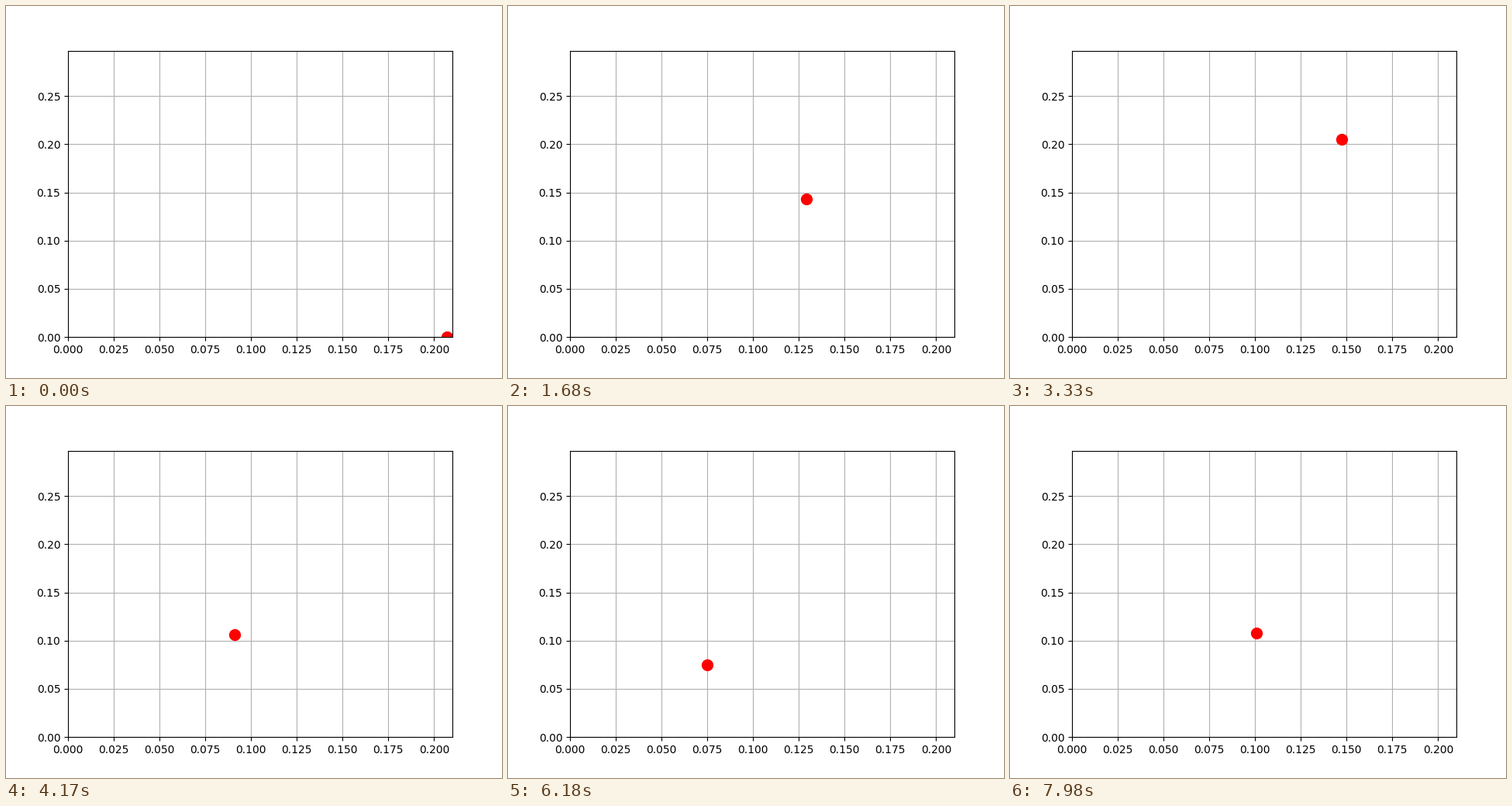
Write a matplotlib script that moves like this. It is 640 px wide and 480 px high and loops after 8000 ms.

```python
import math
import matplotlib.pyplot as plt
from matplotlib.animation import FuncAnimation

W, H = 0.21, 0.297                # A4 sheet in metres
LOOP, TICK, STEP = 8000, 20, 30   # ms

# Turning points of the swing about the sheet centre: (seconds, pixels)
TURNS_X = [(0.115, 250), (1.22, -100), (1.89, 102), (2.45, -178),
           (3.167, 109), (4.2, -33), (4.7, 15), (5.45, -108), (5.87, -52),
           (6.58, -100), (6.85, -92), (7.21, -111), (7.95, -10)]
TURNS_Y = [(0, 184.6), (0.53, -4), (1.26, 31), (2.04, -13), (2.6, 122),
           (3.5, -88), (4.51, 100), (5.36, -51), (6.04, 106), (6.87, -97),
           (7.735, 84)]


def swing(turns, t):
    """Cosine ease between turning points, carried on past both ends."""
    spans = list(zip(turns, turns[1:]))
    (t0, a), (t1, b) = next((s for s in spans if t < s[1][0]), spans[-1])
    return (a + b) / 2 + (a - b) / 2 * math.cos(math.pi * (t - t0) / (t1 - t0))


fig, ax = plt.subplots(figsize=(6.4, 4.8), dpi=100)
ax.set_xlim(0, W)
ax.set_ylim(0, H)
ax.grid()
pen, = ax.plot([], [], "ro", markersize=10)
px, py = W / 496, H / 369.6       # metres per pixel


def update(i):
    t = (i * TICK + TICK // 2) // STEP * STEP / 1000
    pen.set_data([W / 2 + swing(TURNS_X, t) * px],
                 [H / 2 - swing(TURNS_Y, t) * py])
    return pen,


def reset():
    return update(0)


anim = FuncAnimation(fig, update, frames=LOOP // TICK, init_func=reset,
                     interval=TICK, repeat=True, repeat_delay=0)
plt.show()
```
